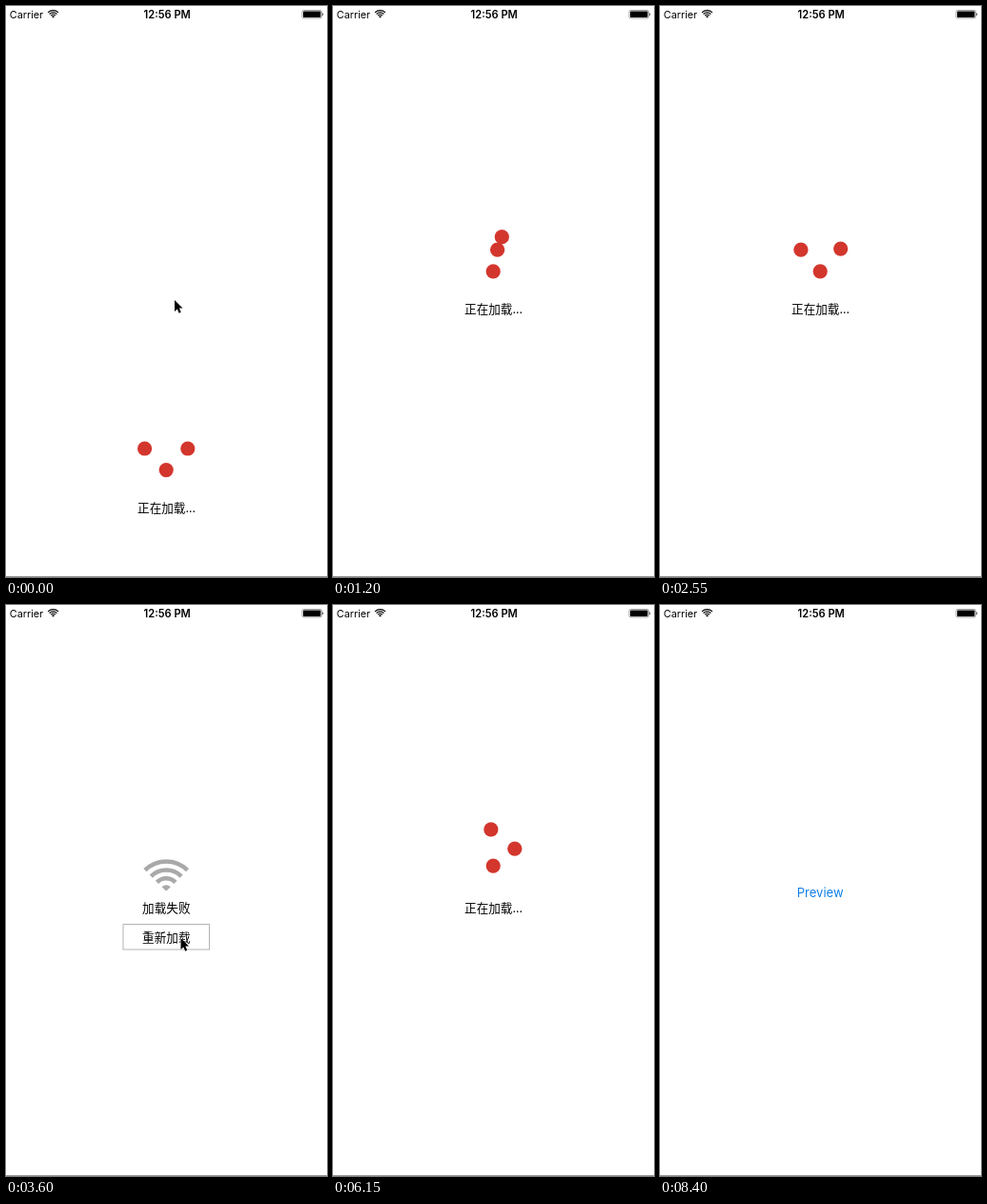
These frames come from a looping animation (337 by 600 pixels, 9000 ms). An HTML page:

```html
<!DOCTYPE html>
<html lang="zh-CN">
<head>
<meta charset="utf-8">
<style>
  html, body { margin: 0; height: 100%; overflow: hidden; background: #fff; }
  svg { display: block; width: 100vw; height: 100vh; }
  text { font-family: Inter, Roboto, sans-serif; text-anchor: middle; }
  .zh { font: 12.6px "Noto Sans CJK SC", "Noto Sans CJK", sans-serif; }
</style>
</head>
<body>
<svg viewBox="0 0 337 600">
  <defs>
    <!-- three arcs and a wedge around the origin -->
    <g id="wifi" fill="none" stroke-width="4.5">
      <path d="M-22.3-22.3A31.5 31.5 0 0 1 22.3-22.3M-15.9-15.9A22.5 22.5 0 0 1 15.9-15.9M-9.7-9.7A13.7 13.7 0 0 1 9.7-9.7"/>
      <path d="M0 0L-4.7-4.7A6.6 6.6 0 0 1 4.7-4.7Z" stroke="none"/>
    </g>
  </defs>
  <text x="168.2" y="306.6" font-size="13" fill="#0f7fe6">Preview</text>

  <g id="sheet">
    <rect width="337" height="601" fill="#fff"/>
    <g id="loading">
      <g fill="#d3362d"><circle r="7.6"/><circle r="7.6"/><circle r="7.6"/></g>
      <text class="zh" x="168.5" y="323.3">正在加载...</text>
    </g>
    <g id="failed">
      <g transform="translate(168.2 301)" stroke="#a9a9a9">
        <use href="#wifi"/>
        <path d="M0-.6L-4.7-4.7A6.6 6.6 0 0 1 4.7-4.7Z" fill="#a9a9a9" stroke="none"/>
      </g>
      <text class="zh" x="168.3" y="323.3">加载失败</text>
      <rect x="123" y="335.5" width="90.5" height="26.5" fill="none" stroke="#aaa" stroke-width=".9"/>
      <text class="zh" x="168.3" y="353.6">重新加载</text>
    </g>
  </g>

  <g id="status">
    <text x="21.5" y="12.7" font-size="10.8">Carrier</text>
    <g transform="translate(49.5 12.4) scale(.245)" stroke="#000">
      <use href="#wifi" stroke-width="5"/>
      <path d="M0 0L-6-6A8.5 8.5 0 0 1 6-6Z" stroke="none"/>
    </g>
    <text x="169.2" y="12.7" font-size="11.1" font-weight="600">12:56 PM</text>
    <rect x="311" y="4.5" width="20.4" height="8.4" rx="1.6" fill="none" stroke="#777" stroke-width=".7"/>
    <rect x="312" y="5.4" width="18.4" height="6.6" rx=".8"/>
    <path d="M332.2 7.2a1.6 1.6 0 0 1 0 3z" fill="#444"/>
  </g>
  <rect y="599" width="337" height="1" fill="#999"/>
  <path id="cursor" d="M0 0V12L2.8 9.4 4.7 13.7 6.7 12.8 4.9 8.6H8.5Z" stroke="#fff" stroke-width=".9" paint-order="stroke"/>
</svg>
<script>
const LOOP = 9000, STEP = 150;
const $ = id => document.getElementById(id);
const dots = document.querySelectorAll('circle');
const mix = (a, b, p) => a + (b - a) * p;
const ease = p => p * p * (3 - 2 * p);
const show = (el, on) => el.setAttribute('visibility', on ? 'visible' : 'hidden');
const move = (el, x, y) => el.setAttribute('transform', `translate(${x} ${y})`);

// right, top, left, bottom
const slots = [[190.8, 256.2], [168.2, 233.6], [145.6, 256.2], [168.2, 278.8]];

// Pointer visits as [time, x, y]; hidden outside each visit
const visits = [
  [[0, 177, 309]],
  [[3300, 328, 368], [3450, 222, 356], [3600, 183.5, 350], [4050, 183.5, 350], [4200, 251, 351]],
  [[7200, 328, 204], [7350, 275, 228], [7500, 220, 262], [7650, 180, 287], [7800, 158, 300],
   [7950, 150, 305], [8100, 150, 305], [8250, 258, 276]]
];

// Critically damped spring, 0 to 1
function spring(ms) {
  const x = Math.max(0, ms) * 0.00898;
  return 1 - (1 + x) * Math.exp(-x);
}

// One dot steps into the free slot while the dot opposite crosses over to refill
function placeDots(t) {
  const [start, span] = t < 3000 ? [386, 178.3] : [4170, 150];
  const turns = Math.max(0, (t - start) / span);
  const n = Math.floor(turns), p = ease(turns - n);
  const free = n + 1;
  const routes = [[free + 3, free], [free + 1, free + 3], [free + 2, free + 2]];
  routes.forEach(([from, to], i) => {
    const a = slots[from % 4], b = slots[to % 4];
    move(dots[i], mix(a[0], b[0], p), mix(a[1], b[1], p));
  });
}

function placeCursor(t) {
  const visit = visits.find(v => t >= v[0][0] && t <= v[v.length - 1][0]);
  show($('cursor'), visit);
  if (!visit) return;
  const b = visit.find(k => k[0] >= t);
  const a = visit[visit.indexOf(b) - 1] || b;
  const p = a === b ? 0 : (t - a[0]) / (b[0] - a[0]);
  move($('cursor'), mix(a[1], b[1], p), mix(a[2], b[2], p));
}

function draw(t) {
  const failed = t >= 3000 && t < 3900;
  show($('failed'), failed);
  show($('loading'), !failed);
  move($('sheet'), 0, 600 * (t < 3000 ? 1 - spring(t + 248) : spring(t - 7183)));
  placeDots(t);
  placeCursor(t);
}

const begin = performance.now();
function tick() {
  const t = (performance.now() - begin) % LOOP;
  draw(Math.floor(t / STEP) * STEP);
  requestAnimationFrame(tick);
}
tick();
</script>
</body>
</html>
```
